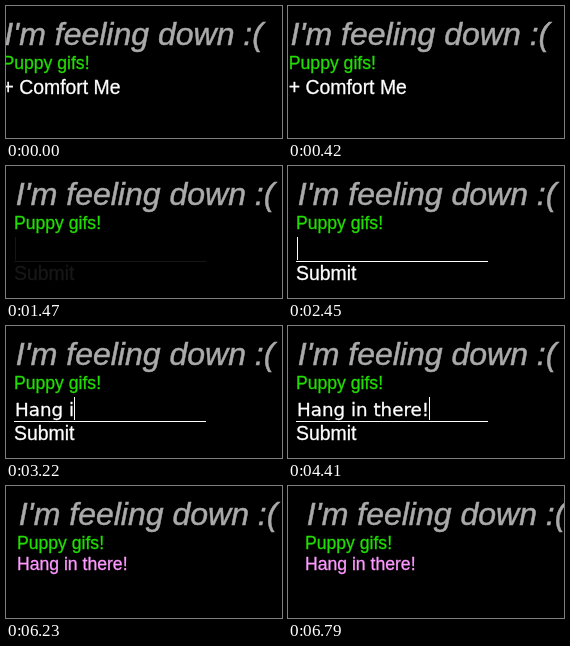
An HTML page for the animation above (6860 ms loop, 276 by 132 pixels).

```html
<!DOCTYPE html>
<html lang="en">
<head>
<meta charset="utf-8">
<title>Comfort list</title>
<style>
  html, body { margin: 0; width: 100%; height: 100%; overflow: hidden; background: #000; }
  svg { display: block; width: 276px; height: 132px; }
  text {
    font: 17.6px "Liberation Sans", Arial, sans-serif;
    color: #fff; fill: currentColor; stroke: currentColor; stroke-width: .3px;
    white-space: pre;
  }
  .title { font-size: 32px; font-style: italic; color: #aaa; stroke-width: .5px; }
  .first { color: #2d0; }
  .added { color: #f9f; }
  .action { font-size: 19.4px; }
  .typed { font: 18.3px "DejaVu Sans", sans-serif; }
  rect { fill: #fff; }
</style>
</head>
<body>
<svg viewBox="0 0 276 132">
  <g id="page">
    <text class="title" x="9.7" y="39">I'm feeling down :(</text>
    <text class="first" x="8" y="63">Puppy gifs!</text>
    <text class="added" id="added" x="8" y="84">Hang in there!</text>
    <text class="action" id="open" x="8" y="88">+ Comfort Me</text>
    <g id="form">
      <text class="typed" id="typed" x="9" y="90">Hang in there!</text>
      <rect id="caret" x="9" y="71" width="1" height="23"/>
      <rect x="8" y="95" width="192" height="1"/>
      <text class="action" x="8" y="114">Submit</text>
    </g>
  </g>
</svg>
<script>
const LOOP = 6860, TICK = 70;
const SUBMIT = 4970;

// typing comes in bursts, each with its own pace in ms per letter
const BURSTS = [
  { text: 'Hang', at: 2660, pace: 140 },
  { text: ' in ', at: 3150, pace: 70 },
  { text: 'there', at: 3500, pace: 52 },
  { text: '!', at: 4410, pace: 70 }
];

const $ = id => document.getElementById(id);
const page = $('page'), added = $('added'), open = $('open');
const form = $('form'), typed = $('typed'), caret = $('caret');

const message = typed.textContent;
const caretStops = [9];
for (let i = 0; i < message.length; i++) caretStops.push(typed.getEndPositionOfChar(i).x);

const clamp = (v, max) => Math.min(max, Math.max(0, v));

// linear and eased progress from 0 to 1
const ramp = (t, from, to) => clamp((t - from) / (to - from), 1);
const swing = (t, from, to) => 0.5 - Math.cos(ramp(t, from, to) * Math.PI) / 2;

// slides in, overshoots a little, settles, and drifts off at the end
const sway = t =>
  -11.5 + 13 * ramp(t, 70, 1120) - 1.5 * ramp(t, 1120, 1470) + 9 * ramp(t, 5950, 6790);

const lettersAt = t => BURSTS.reduce(
  (n, { text, at, pace }) => n + clamp(Math.floor((t - at) / pace) + 1, text.length), 0);

function render(t) {
  const sent = t >= SUBMIT;
  const blink = t >= 1960 && t < 2450;
  const count = lettersAt(t);

  page.setAttribute('transform', `translate(${sway(t)} 0)`);
  open.style.opacity = 1 - swing(t, 980, 1390);
  added.style.opacity = sent ? 1 : 0;

  form.style.opacity = sent ? 1 - swing(t, SUBMIT - 30, 5390) : swing(t, 1390, 1810);
  form.setAttribute('transform', `translate(0 ${sent ? 21 : 0})`);
  typed.textContent = message.slice(0, count);
  caret.setAttribute('x', Math.round(caretStops[count]));
  caret.style.opacity = blink || sent ? 0 : 1;
}

const start = performance.now();
function frame() {
  const t = (performance.now() - start) % LOOP;
  render(Math.floor(t / TICK + 1e-6) * TICK);
  requestAnimationFrame(frame);
}
render(0);
requestAnimationFrame(frame);
</script>
</body>
</html>
```
